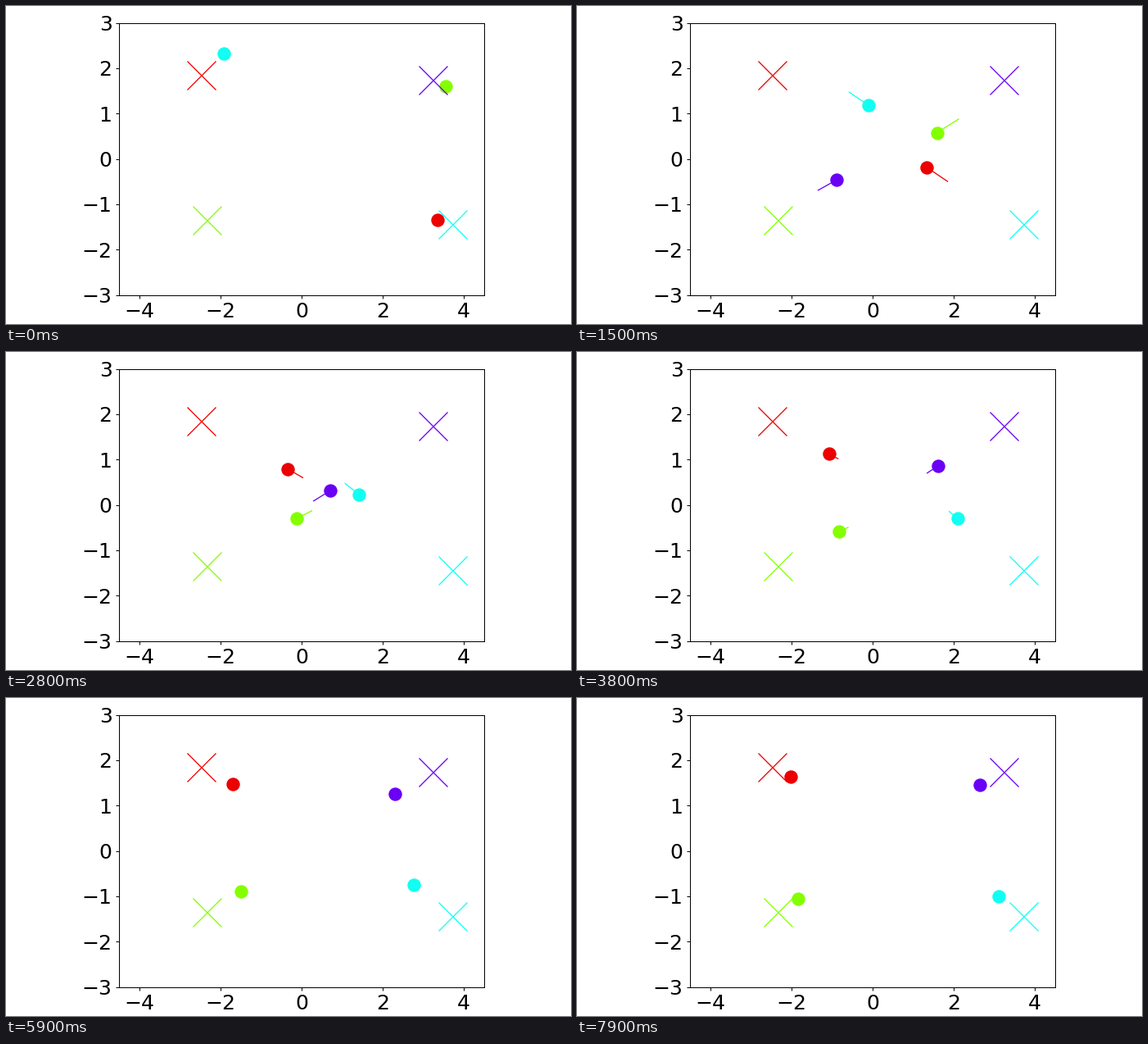
Animation, 690 px wide and 388 px high, one loop 8000 ms. Source, as a matplotlib script:

```python
import numpy as np
import matplotlib.pyplot as plt
from matplotlib.animation import FuncAnimation

W, H, DPI = 690, 388, 100
FRAMES, STEP = 80, 0.1   # frame count, seconds per frame
TRAIL = 0.36             # seconds of path kept behind each agent
PX = 72 / DPI            # points per pixel

TIMES = np.array([0, .54, .9, 1.64, 2, 3.8, 5, 5.9, 7.9])

# colour, goal, x and y at TIMES, time of first appearance
AGENTS = [
    ("#ec0000", (-2.48, 1.86),
     [3.34, 2.58, 2.16, 1.13, .585, -1.08, -1.485, -1.70, -2.03],
     [-1.35, -.91, -.68, -.06, .28, 1.125, 1.34, 1.465, 1.635], 0),
    ("#84ff00", (-2.355, -1.34),
     [3.55, 2.865, 2.44, 1.37, .81, -.83, -1.27, -1.49, -1.84],
     [1.60, 1.265, 1.05, .46, .155, -.59, -.785, -.89, -1.05], 0),
    ("#10fff2", (3.705, -1.43),
     [-1.92, -1.29, -.88, .08, .565, 2.10, 2.53, 2.755, 3.11],
     [2.325, 1.915, 1.655, 1.075, .795, -.305, -.60, -.755, -1.0], 0),
    ("#6a00f4", (3.235, 1.745),
     [-2.745, -2.08, -1.645, -.705, -.245, 1.61, 2.04, 2.29, 2.645],
     [-1.40, -1.055, -.84, -.38, -.18, .86, 1.11, 1.25, 1.455], STEP),
]


def smooth(t, v):
    """Cubic Hermite curve through the values v at TIMES."""
    v = np.asarray(v)
    m = np.gradient(v, TIMES)
    i = np.clip(np.searchsorted(TIMES, t, side="right") - 1, 0, len(TIMES) - 2)
    h = TIMES[i + 1] - TIMES[i]
    u = (t - TIMES[i]) / h
    return ((1 + 2 * u) * (1 - u) ** 2 * v[i] + u * (1 - u) ** 2 * h * m[i]
            + u * u * (3 - 2 * u) * v[i + 1] - u * u * (1 - u) * h * m[i + 1])


fig = plt.figure(figsize=(W / DPI, H / DPI), dpi=DPI, facecolor="white")
left, right, top, bottom = 138.3, 584, 20.5, 352.6
ax = fig.add_axes([left / W, 1 - bottom / H, (right - left) / W, (bottom - top) / H])
ax.set(xlim=(-4.5, 4.5), ylim=(-3, 3),
       xticks=range(-4, 5, 2), yticks=range(-3, 4))
ax.tick_params(labelsize=25 * PX, length=4.4 * PX, width=PX, pad=4.4 * PX)
for spine in ax.spines.values():
    spine.set_linewidth(PX)

trails, dots = [], []
for n, (color, goal, *_) in enumerate(AGENTS):
    trails += ax.plot([], [], color=color, lw=1.3 * PX, zorder=2)
    dots += ax.plot([], [], "o", color=color, ms=16.4 * PX, mew=0, zorder=3 + n / 10)
    ax.plot(*goal, "x", color=color, ms=35 * PX, mew=1.3 * PX, zorder=4)


def draw(frame):
    t = frame * STEP
    past = np.linspace(max(0, t - TRAIL), t, 8)
    for (_, _, xs, ys, start), trail, dot in zip(AGENTS, trails, dots):
        x, y = smooth(past, xs), smooth(past, ys)
        trail.set_data(x, y)
        dot.set_data(x[-1:], y[-1:])
        shown = t >= start
        trail.set_visible(shown)
        dot.set_visible(shown)
    return trails + dots


anim = FuncAnimation(fig, draw, frames=FRAMES, interval=1000 * STEP,
                     repeat=True, repeat_delay=0)
plt.show()
```
